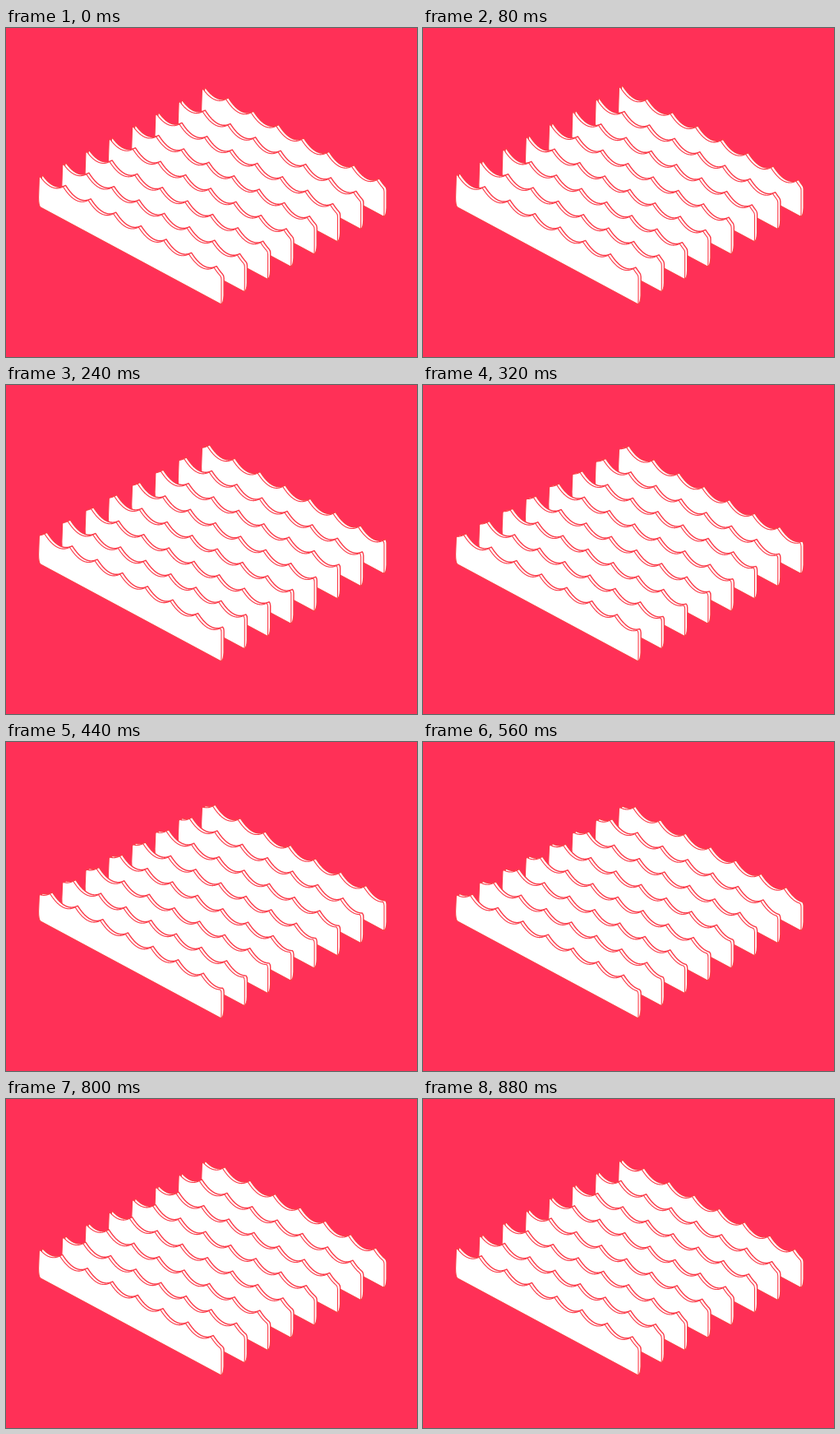
Animation, 500 px wide and 400 px high, one loop 0.92 s. Source, as an HTML page with a canvas:

```html
<!DOCTYPE html>
<html lang="en">
<head>
<meta charset="utf-8">
<title>Isometric waves</title>
<style>
  html, body { margin: 0; width: 100%; height: 100%; overflow: hidden; background: #ff3057; }
  canvas { display: block; }
</style>
</head>
<body>
<canvas id="stage" width="500" height="400"></canvas>
<script>
const ctx = document.getElementById('stage').getContext('2d');
const RED = '#ff3057', LINE = '#fb3a48';
const LOOP = 920, STEP = 40;
const PANELS = 8, GAP_X = 28.29, GAP_Y = -15.22;
const LEFT = 40.4, RIGHT = 262, SLOPE = 0.535, ROUND = 1.5;
const PERIOD = 30.6, DEPTH = 8, CUSP_X = 69.5, CUSP_Y = 193;
const THICK_X = 3.1, THICK_Y = -1.65;

// Height of the scalloped top edge: parabolic arcs hung from a slanted line.
function topEdge(x, shift) {
  const turns = (x - CUSP_X - shift) / PERIOD;
  const u = turns - Math.floor(turns);
  return CUSP_Y + SLOPE * (x - CUSP_X) + 4 * DEPTH * u * (1 - u);
}

function slab(shift, dx, dy) {
  const path = new Path2D();
  const start = LEFT + ROUND, end = RIGHT - ROUND;
  const startY = topEdge(start, shift) + dy, endY = topEdge(end, shift) + dy;
  path.moveTo(42, 218.1);
  path.quadraticCurveTo(39.6, 216, 39.6, 206);
  path.lineTo(LEFT + dx, startY + ROUND);
  path.quadraticCurveTo(LEFT + dx, startY, start + dx, startY);
  for (let x = start; x < end; x += 0.25) path.lineTo(x + dx, topEdge(x, shift) + dy);
  path.lineTo(end + dx, endY);
  path.quadraticCurveTo(RIGHT + dx, endY + ROUND, RIGHT + dx, endY + 3 * ROUND);
  path.lineTo(RIGHT + dx, 325);
  path.quadraticCurveTo(RIGHT + dx * 0.9, 334.6, RIGHT - 0.2, 335.9);
  path.closePath();
  return path;
}

function paint(path, width) {
  ctx.lineWidth = width;
  ctx.fill(path);
  ctx.stroke(path);
}

function draw(ms) {
  const frame = Math.floor((ms % LOOP) / STEP);
  const shift = PERIOD * frame * STEP / LOOP;
  const back = slab(shift, THICK_X, THICK_Y);
  const front = slab(shift, 0, 0);

  ctx.fillStyle = RED;
  ctx.fillRect(0, 0, 500, 400);
  ctx.fillStyle = '#fff';
  ctx.strokeStyle = LINE;
  ctx.lineJoin = 'round';
  for (let i = PANELS - 1; i >= 0; i--) {
    ctx.save();
    ctx.translate(i * GAP_X, i * GAP_Y);
    paint(back, 1.4);
    paint(front, 1.1);
    ctx.restore();
  }
}

function tick(now) {
  draw(now);
  requestAnimationFrame(tick);
}
draw(0);
requestAnimationFrame(tick);
</script>
</body>
</html>
```
